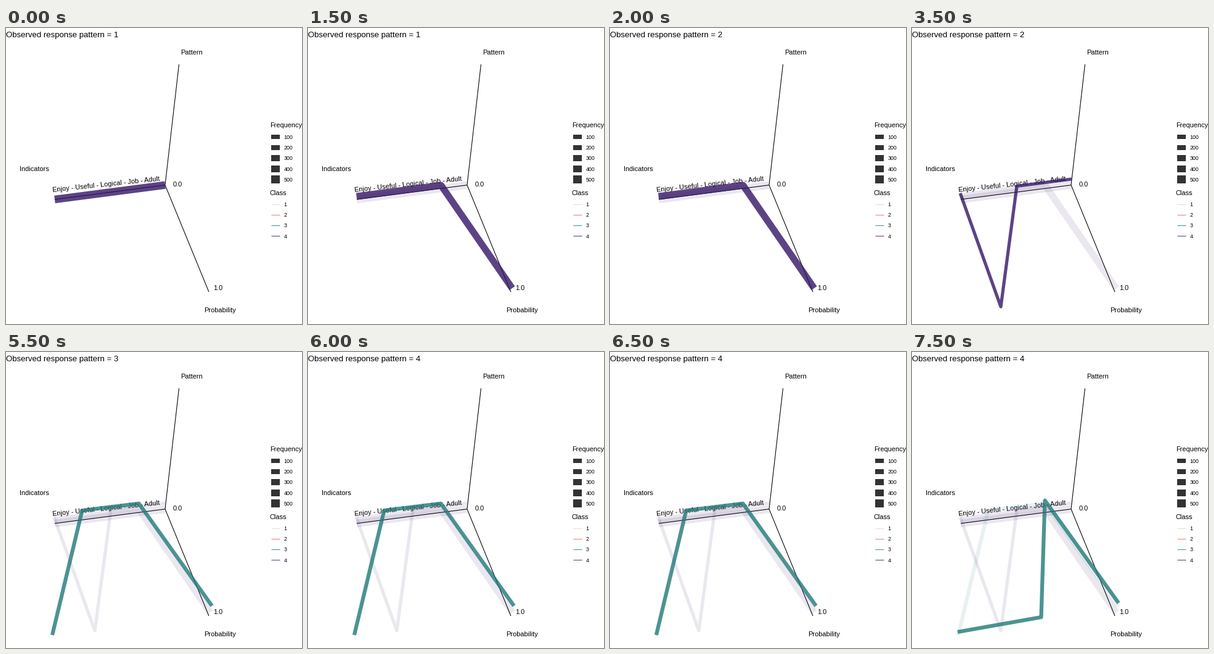
A matplotlib script that plays this animation: 480x480 px, repeating every 8 s.

```python
import matplotlib.pyplot as plt
from matplotlib.animation import FuncAnimation
from matplotlib.patches import Rectangle

SIZE, DPI = 480, 72          # at 72 dpi one point equals one pixel
INTERVAL, FRAMES = 500, 16

plt.rcParams["font.family"] = "Liberation Sans"
CLASS_COLORS = ["#d9dcc0", "#e8645e", "#1f7878", "#331565"]
TEAL, PURPLE = CLASS_COLORS[2:]

# (first frame, color, line width, vertices)
PATTERNS = [
    (0, PURPLE, 12.4, [(79, 278), (258, 254.7)]),
    (3, PURPLE, 11, [(78.7, 273), (215.7, 255), (331, 422)]),
    (7, PURPLE, 5.2, [(78.2, 268), (144, 452), (170, 256.5), (258.8, 245)]),
    (11, TEAL, 6.2, [(75, 459), (123.5, 257), (215.5, 245.7), (334, 411.7)]),
    (15, TEAL, 6.2, [(74, 454), (209.5, 430), (215.5, 240.7), (335, 407)]),
]
TITLE_CHANGES = [4, 8, 12]

fig = plt.figure(figsize=(SIZE / DPI, SIZE / DPI), dpi=DPI, facecolor="white")
ax = fig.add_axes([0, 0, 1, 1])
ax.set_xlim(0, SIZE)
ax.set_ylim(SIZE, 0)
ax.axis("off")


def label(x, y, text, size=11, **kw):
    return ax.text(x, y, text, size=size, color="black",
                   ha="left", va="baseline", **kw)


def path(points, color, width, **kw):
    xs, ys = zip(*points)
    return ax.plot(xs, ys, color=color, lw=width, solid_capstyle="butt",
                   solid_joinstyle="round", **kw)[0]


# Axes of the 3D plot
ORIGIN = (258, 254.7)
for tip in [(280.5, 59), (79, 278), (329, 428)]:
    path([ORIGIN, tip], "black", 1.07, zorder=1)

title = label(0, 15, "", 13.2)
label(283.5, 43.3, "Pattern")
label(22, 232.3, "Indicators")
label(321.5, 461.3, "Probability")
label(271, 257.3, "0.0")
label(336, 425.3, "1.0")
label(75.5, 266.5, "Enjoy - Useful - Logical - Job - Adult",
      rotation=6, rotation_mode="anchor", zorder=1.5)

# Legends
KEY_STEP = 17.28
label(428, 161, "Frequency")
for i, height in enumerate([6.2, 8.2, 9.8, 11.2, 12.4]):
    y = 176.5 + i * KEY_STEP
    ax.add_patch(Rectangle((429.7, y - height / 2), 13.8, height,
                           fc="#333333", ec="none"))
    label(450.5, y + 3.3, str(100 * (i + 1)), 8.8)

label(428, 271, "Class")
for i, color in enumerate(CLASS_COLORS):
    y = 285.6 + i * KEY_STEP
    path([(429.7, y), (443.5, y)], color, 1.07, alpha=0.8)
    label(450.5, y + 3.3, str(i + 1), 8.8)

lines = [path(points, color, width, zorder=2 + 0.1 * i)
         for i, (_, color, width, points) in enumerate(PATTERNS)]


def update(frame):
    number = 1 + sum(frame >= change for change in TITLE_CHANGES)
    title.set_text(f"Observed response pattern = {number}")
    current = sum(frame >= start for start, *_ in PATTERNS) - 1
    for i, line in enumerate(lines):
        line.set_visible(i <= current)
        line.set_alpha(0.8 if i == current else 0.1)
    return [title, *lines]


anim = FuncAnimation(fig, update, frames=FRAMES, interval=INTERVAL,
                     repeat=True, repeat_delay=0, blit=False)
plt.show()
```
